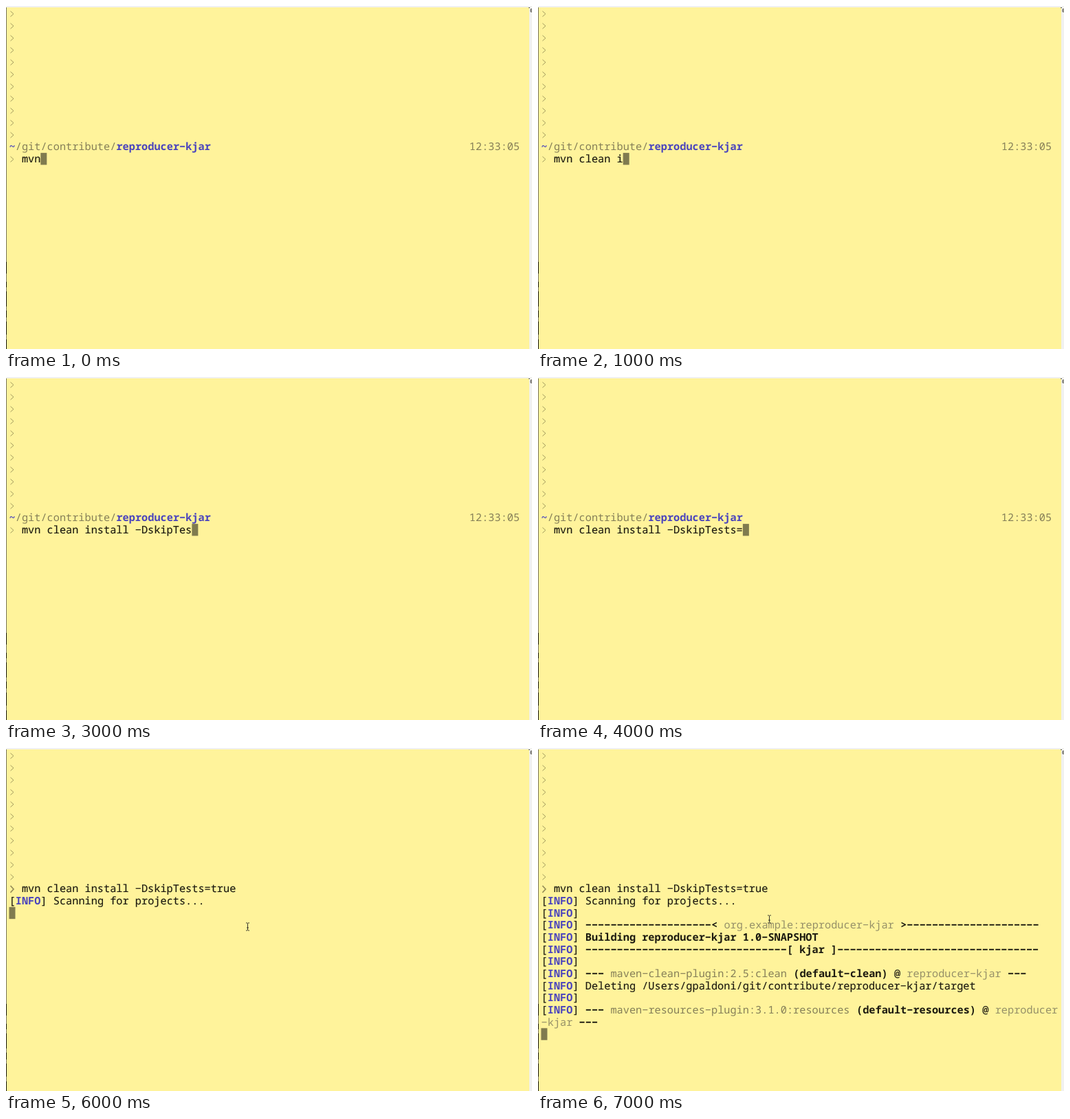
An HTML page that plays this animation: 765x500 px, repeating every 8 s.

```html
<!DOCTYPE html>
<html lang="en">
<head>
<meta charset="utf-8">
<title>Terminal build</title>
<style>
  html, body { margin: 0; width: 100%; height: 100%; overflow: hidden; background: #fff39b; }
  svg { display: block; width: 765px; height: 500px; }
  text {
    font-family: "Noto Sans Mono", "DejaVu Sans Mono", monospace;
    font-size: 15.28px;
    white-space: pre;
    text-rendering: geometricPrecision;
  }
  .ink { fill: #1c1a10; font-weight: 500; stroke: #1c1a10; stroke-width: .15; }
  .bold { fill: #1c1a10; font-weight: 700; }
  .blue { fill: #4a44bd; font-weight: 700; }
  .dim { fill: #857f58; }
  .pale { fill: #959068; }
  .prompt { fill: none; stroke: #a39a5e; stroke-width: 1; }
  .strong { stroke: #958c58; stroke-width: 1.7; }
</style>
</head>
<body>
<svg viewBox="0 0 765 500" xmlns="http://www.w3.org/2000/svg">
  <rect width="765" height="500" fill="#f1f1ef"/>
  <rect x="1" y="2" width="760" height="498" fill="#fff39b"/>
  <rect y="2" width="1" height="498" fill="#77745f"/>
  <path d="M.5 373v17M.5 402v8M.5 416v22M.5 444v10M.5 460v19M.5 486v14" stroke="#15140f"/>
  <path d="M760 2.5h2M765 4.5h-2v4h2M763 6.5h2" fill="none" stroke="#55534c"/>
  <g id="screen"></g>
  <rect id="caret" width="9" height="17.4" fill="#807b4f"/>
  <path id="beam" d="M-2.5 -5.5H-.8L0 -4.8L.8 -5.5H2.5M0 -4.8V4.8M-2.5 5.5H-.8L0 4.8L.8 5.5H2.5M-1.5 1.5H1.5"
        fill="none" stroke="#37362c"/>
</svg>
<script>
const LOOP = 8000, STEP = 1000;
const CELL = 9.168, LEFT = 4.6, PITCH = 17.66, TOP = 2.2, BASE = 16.2;
const NS = "http://www.w3.org/2000/svg";
const byId = id => document.getElementById(id);
const screen = byId("screen"), caret = byId("caret"), beam = byId("beam");

const COMMAND = "mvn clean install -DskipTests=true";
const TYPED = [3, 11, 19, 27, 30];
const PROJECT = "reproducer-kjar";
const dash = n => "-".repeat(n);

// A run is [style, text]; runs follow each other on a row.
const info = (...runs) => [["ink", "["], ["blue", "INFO"], ["ink", "] "], ...runs];
const scanning = info(["ink", "Scanning for projects..."]);
const build = [
  scanning,
  info(),
  info(["bold", dash(20) + "< "], ["pale", "org.example:" + PROJECT], ["bold", " >" + dash(21)]),
  info(["bold", "Building " + PROJECT + " 1.0-SNAPSHOT"]),
  info(["bold", dash(32) + "[ kjar ]" + dash(32)]),
  info(),
  info(["bold", "--- "], ["dim", "maven-clean-plugin:2.5:clean"], ["bold", " (default-clean)"],
    ["ink", " @ "], ["pale", PROJECT], ["bold", " ---"]),
  info(["ink", "Deleting /Users/gpaldoni/git/contribute/" + PROJECT + "/target"]),
  info(),
  info(["bold", "--- "], ["dim", "maven-resources-plugin:3.1.0:resources"], ["bold", " (default-resources)"],
    ["ink", " @ "], ["pale", "reproducer"]),
  [["pale", "-kjar"], ["bold", " ---"]]
];

function add(tag, attrs) {
  const el = document.createElementNS(NS, tag);
  for (const k in attrs) el.setAttribute(k, attrs[k]);
  return screen.appendChild(el);
}

function prompt(row, strong) {
  const y = TOP + row * PITCH + 9.3, h = strong ? 5 : 4;
  add("path", { d: `M6.5 ${y - h}L11 ${y}L6.5 ${y + h}`, class: strong ? "prompt strong" : "prompt" });
}

function line(row, runs, col = 0) {
  for (const [style, str] of runs) {
    const el = add("text", { x: LEFT + col * CELL, y: BASE + row * PITCH, class: style });
    el.textContent = str.replace(/-/g, "\u2212"); // wide terminal dash
    col += str.length;
  }
}

function placeCaret(row, col) {
  caret.setAttribute("x", LEFT + col * CELL - .1);
  caret.setAttribute("y", TOP + row * PITCH);
}

function showBeam(x, y) {
  beam.setAttribute("visibility", x ? "visible" : "hidden");
  beam.setAttribute("transform", `translate(${x} ${y})`);
}

function render(step) {
  screen.replaceChildren();
  for (let row = 0; row < 11; row++) prompt(row);
  showBeam(0, 0);

  if (step < TYPED.length) {
    const n = TYPED[step];
    line(11, [["blue", "~"], ["dim", "/git/contribute/"], ["blue", PROJECT]]);
    line(11, [["dim", "12:33:05"]], 73);
    prompt(12);
    line(12, [["ink", COMMAND.slice(0, n)]], 2);
    placeCaret(12, n + 2);
    return;
  }

  prompt(11, true);
  line(11, [["ink", COMMAND]], 2);
  const output = [[], [scanning], build][step - TYPED.length];
  output.forEach((runs, i) => line(12 + i, runs));
  placeCaret(12 + output.length, 0);
  if (step === 6) showBeam(351.5, 260.5);
  if (step === 7) showBeam(336.5, 249.5);
}

let shown = -1;
const start = performance.now();
function tick() {
  const step = Math.floor(((performance.now() - start) % LOOP) / STEP);
  if (step !== shown) render(shown = step);
  requestAnimationFrame(tick);
}
tick();
</script>
</body>
</html>
```
